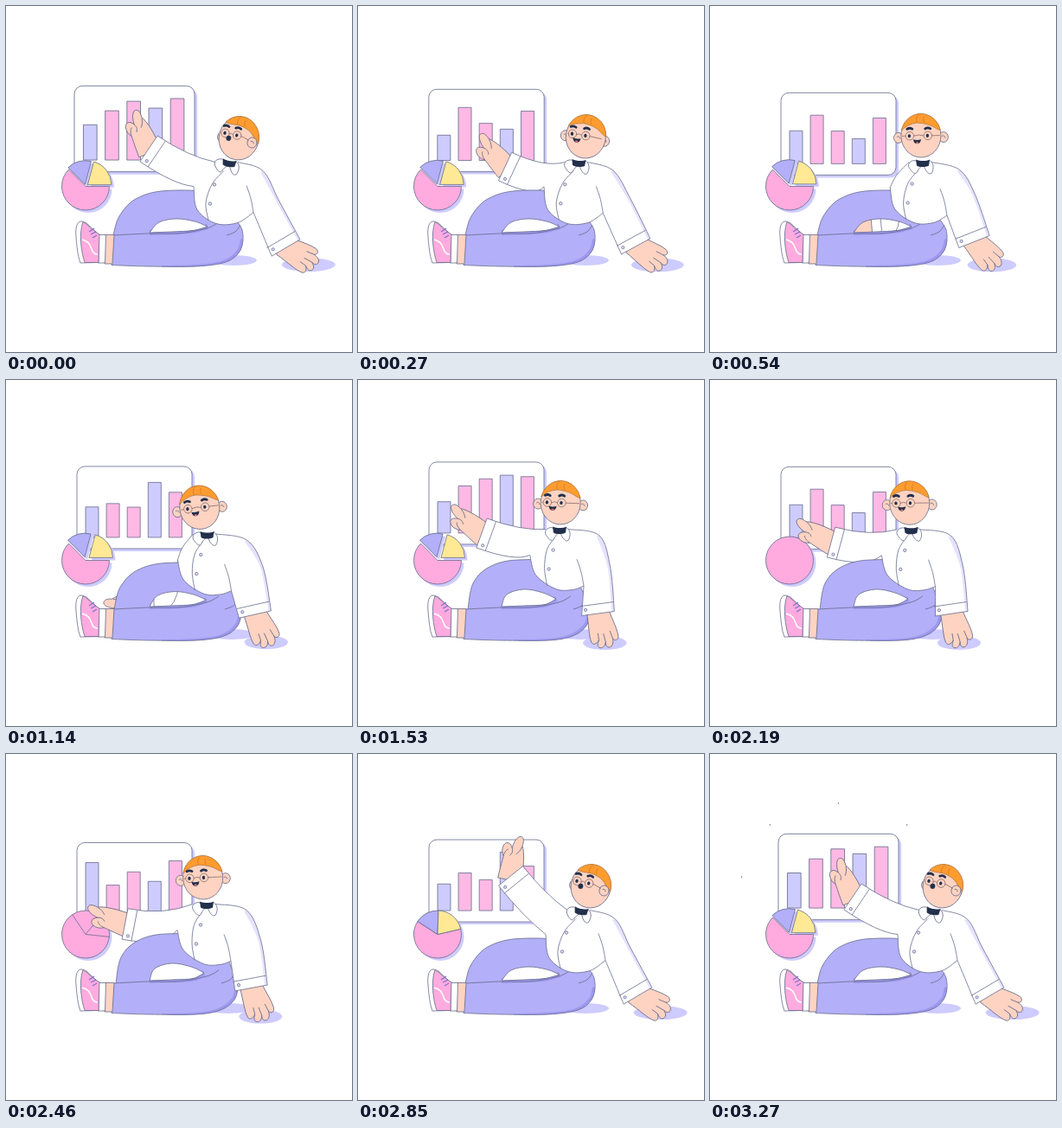
An HTML page with a canvas that plays this animation: 400 by 400 pixels, repeating every 3300 ms.

```html
<!DOCTYPE html>
<html lang="en">
<head>
<meta charset="utf-8">
<title>Chart presenter</title>
<style>
html, body { margin: 0; width: 100%; height: 100%; overflow: hidden; background: #fff; }
canvas { display: block; width: 100%; height: 100%; }
</style>
</head>
<body>
<canvas id="stage"></canvas>
<script>
const LOOP = 3300, BEAT = LOOP / 2, TAU = Math.PI * 2, RAD = Math.PI / 180;
const LINE = '#666b8c', LAV = '#cecbff', PINK = '#ffb9e4', ROSE = '#ffabdf', YELLOW = '#ffe994',
  VIOLET = '#b3aff8', SHADE = '#9d98ee', SKIN = '#fed3c1', HAIR = '#ff9c30', NAVY = '#22304c',
  WIRE = '#8a6f70', MIST = '#e5e2ff';

const canvas = document.getElementById('stage');
const c = canvas.getContext('2d');

// A pose: neck x y, resting wrist x y, pointing wrist x y and angle, head tilt, gaze
const tapBoard = [255, 180.5, 323.5, 279.5, 165, 165, -112, 11, -9.5];
const rest = [243, 180.5, 305.5, 272.5, 187, 255, -190, -1, -2.5];
const turning = [229.5, 178, 288, 271, 160, 256, -185, -7, -3.5];
const tapPie = [230, 172.5, 277.5, 270, 143, 177, -140, 2, -7];
const slicePie = [229, 173.5, 283.5, 270.5, 137.5, 196.5, -158, -3, -7];
const raise = [...tapBoard.slice(0, 4), 176.5, 141, -78, ...tapBoard.slice(7)];
const moves = [[0, tapBoard], [150, tapBoard], [540, rest], [980, rest], [1140, turning], [1380, tapPie],
  [1890, tapPie], [2460, slicePie], [2780, raise], [2850, raise], [3040, tapBoard], [LOOP, tapBoard]];

const clamp = v => Math.max(0, Math.min(1, v));
const ramp = (t, a, b) => clamp((t - a) / (b - a));
const smooth = (t, a, b) => { const p = ramp(t, a, b); return p * p * (3 - 2 * p); };
const easeOut = p => 1 - (1 - p) ** 3;
const dir = deg => [Math.cos(deg * RAD), Math.sin(deg * RAD)];
const go = (p, d, len) => [p[0] + d[0] * len, p[1] + d[1] * len];
const shift = (p, x, y) => [p[0] + x, p[1] + y];

// Monotone cubic through the moves, so passing poses keep their speed
function poseAt(t) {
  const i = Math.max(1, moves.findIndex(m => m[0] > t));
  const slope = (n, j) => n < 1 || n >= moves.length ? 0
    : (moves[n][1][j] - moves[n - 1][1][j]) / (moves[n][0] - moves[n - 1][0]);
  const mean = (a, b) => a * b > 0 ? 2 * a * b / (a + b) : 0;
  const [t0, from] = moves[i - 1], [t1, to] = moves[i], h = t1 - t0, s = (t - t0) / h;
  return from.map((v, j) => {
    const mid = slope(i, j);
    return v + (to[j] - v) * s * s * (3 - 2 * s)
      + h * s * (1 - s) * (mean(slope(i - 1, j), mid) * (1 - s) - mean(mid, slope(i + 1, j)) * s);
  });
}

// Smooth curves through points, joined by corners
function trace(...segs) {
  const p = new Path2D();
  segs.forEach((s, n) => {
    const pt = i => s[Math.max(0, Math.min(s.length - 1, i))];
    n ? p.lineTo(...s[0]) : p.moveTo(...s[0]);
    for (let i = 0; i < s.length - 1; i++) {
      const [a, b, d, e] = [pt(i - 1), pt(i), pt(i + 1), pt(i + 2)];
      p.bezierCurveTo(b[0] + (d[0] - a[0]) / 6, b[1] + (d[1] - a[1]) / 6,
        d[0] - (e[0] - b[0]) / 6, d[1] - (e[1] - b[1]) / 6, ...d);
    }
  });
  return p;
}
function paint(p, fill, line = LINE, width = .8) {
  if (fill) { c.fillStyle = fill; c.fill(p); }
  if (line) { c.strokeStyle = line; c.lineWidth = width; c.stroke(p); }
}
const svg = (d, fill, line, width) => paint(new Path2D(d), fill, line, width);
function oval(x, y, rx, ry, fill, line) {
  const p = new Path2D();
  p.ellipse(x, y, rx, ry, 0, 0, TAU);
  paint(p, fill, line);
}
const dot = (x, y, r, fill, line) => oval(x, y, r, r, fill, line);
function box(x, y, w, h, r, fill, line) {
  const p = new Path2D();
  p.roundRect(x, y, w, h, r);
  paint(p, fill, line);
}
function group(x, y, angle, scale, draw) {
  c.save();
  c.translate(x, y);
  c.rotate(angle * RAD);
  c.scale(scale, scale);
  draw();
  c.restore();
}

function burst(x, y, rx, ry, p) {
  if (p <= 0 || p >= 1) return;
  const colors = [YELLOW, PINK, PINK, LAV], e = easeOut(p);
  for (let i = 0; i < 8; i++) {
    const [dx, dy] = dir(i * 45);
    dot(x + dx * rx * e, y + dy * ry * e, 3.2 * (1 - p * p), colors[i % 4]);
  }
}

// Each bar: mean height, then cosine and sine weights of two harmonics
const WAVES = [[39, -10, 0, 10, 0], [48.7, 11.2, 8, -5.4, -3.2], [46.3, 8.5, -1, 10.2, -2.5],
  [48.9, 9.7, -19.7, -1.1, -1.6], [58.1, 3.5, 0, 6.4, 0]];

function board(t) {
  const w = t * TAU / BEAT, y = 146 - 4 * Math.cos(w), p = ramp(t, 2900, LOOP);
  const pop = smooth(t, 2920, 3080) + 1 - smooth(t, 0, 320);
  burst(148.5, 142, 112, 85, p);
  group(148.5, y, 0, 1 + .045 * pop, () => {
    box(-63.5, -44.5, 133, 95, 9, LAV, null);
    box(-66.5, -47.5, 133, 95, 9, '#fff');
    WAVES.forEach(([m, a, b, d, e], i) => {
      const h = m + a * Math.cos(w) + b * Math.sin(w) + d * Math.cos(2 * w) + e * Math.sin(2 * w);
      box(-56.5 + i * 24.1, 34.5 - h, 15, h, 0, i % 3 ? PINK : LAV);
    });
  });
  if (p > 0 && p < .85) {
    c.globalAlpha = .9 * (1 - ramp(p, .25, .85));
    group(148.5, y, 0, .3 + .78 * easeOut(ramp(p, 0, .35)), () => box(-66.5, -47.5, 133, 95, 9, LAV));
    c.globalAlpha = 1;
  }
}

function pie(t) {
  const R = 27.5, p = ramp(t, 1740, 2130), old = t < 1820;
  const spin = old ? 1 : smooth(t, 2480, 2850), open = old ? 1 : smooth(t, 2850, 3240);
  const tint = old ? 1 : ramp(t, 2490, 2640), cut = old ? 1 : ramp(t, 2200, 2420);
  const a = -124 - 23 * spin + 12 * open, b = -50 - 38 * spin + 13 * open, d = 6 - 19 * spin + 13 * open;
  const gap = open * 3 + (old ? 2 * smooth(t, 0, 900) : 0);
  const slice = (from, to, out, color, off, line) => {
    const [x, y] = go([off, off], dir((from + to) / 2), out), path = new Path2D();
    path.moveTo(x, y);
    path.arc(x, y, R, from * RAD, to * RAD);
    path.closePath();
    paint(path, off ? LAV : color, line);
  };
  if (p > 0 && p < .88) {
    c.globalAlpha = 1 - ramp(p, .42, .88);
    dot(92, 208.5, 36.5 * easeOut(ramp(p, 0, .3)), '#c8c3fd');
    c.globalAlpha = 1;
  }
  const q = ramp(p, .3, .72), fresh = p > .15 && p < 1;
  group(92, 208.5, 0, fresh ? .6 + .4 * Math.sqrt(q) : 1, () => {
    if (fresh) c.globalAlpha = q;
    if (tint < 1 || fresh) {
      dot(3, 3, R, LAV, null);
      dot(0, 0, R, ROSE);
      for (const g of [a, b, d]) paint(trace([[0, 0], go([0, 0], dir(g), R * cut)]));
    }
    if (tint > 0 && !fresh) {
      c.globalAlpha = tint;
      for (const off of [3, 0]) {
        slice(d, a + 360, 0, ROSE, off, off ? null : LINE);
        slice(a, b, gap * .8, VIOLET, off, off ? null : LINE);
        slice(b, d, gap, YELLOW, off, off ? null : LINE);
      }
    }
  });
  burst(92, 208.5, 57, 57, p);
}

// Seam and button a little way back up the sleeve
function cuff(outer, inner, along) {
  const a = go(outer, along, -11), b = go(inner, along, -11), mid = go(inner, along, -6);
  paint(trace([a, b]));
  dot(mid[0] + (outer[0] - inner[0]) * .14, mid[1] + (outer[1] - inner[1]) * .14, 1.6, MIST);
}

function pointingArm(wrist, angle, neck, armpit) {
  group(...wrist, angle, 1, () => {
    svg('M-5 -14C8 -14 15 -13 21 -13C27 -18 37 -16 37 -11C37 -8 34 -6 32 -5C38 -5 47 -2 47 2C47 6 42 7 37 6C30 10 14 13 -5 13Z', SKIN);
    svg('M32 -5C28 -3 25 -4 23 -6M21 -13C25 -13 29 -11 30 -9M36 6C31 5 28 3 26 1');
  });
  const d = dir((angle - 180) / 2), side = [-d[1], d[0]];
  const top = go(wrist, side, 18), low = go(wrist, side, -18);
  const sleeve = new Path2D();
  sleeve.moveTo(...neck);
  sleeve.quadraticCurveTo(...go(top, d, -42), ...top);
  sleeve.lineTo(...low);
  sleeve.quadraticCurveTo(...go(low, d, -48), ...armpit);
  paint(sleeve, '#fff');
  cuff(top, low, d);
}

function legs(k, hip) {
  const left = [166, 262], right = [233 - 4 * k, 255 - 2 * k];
  const under = [right, [216, 259.5], [192, 261], left];
  const hole = trace([left, [177 - 5 * k, 250 - 2 * k], [197 - 5 * k, 246 - 4 * k], [218 - 4 * k, 249 - 3 * k], right], under);
  const shape = trace(
    [[124 + 3 * k, 265], [131 + 2 * k, 243 - 8 * k], [150 + 2 * k, 223 - 7 * k], [185, 213.5 - 5.5 * k],
      [240, 218 - 5 * k], [hip - 6, 250], [hip, 266], [hip - 4, 284], [hip - 20, 296], [220, 301], [165, 301], [122, 299.5]],
    [[124, 265]]);
  shape.addPath(hole);
  c.fillStyle = VIOLET;
  c.fill(shape, 'evenodd');
  c.save();
  c.clip(shape, 'evenodd');
  paint(trace([[hip, 270], [hip - 5, 285], [hip - 22, 297], [220, 302], [180, 303]]), null, SHADE, 6);
  paint(trace(under), null, SHADE, 6);
  c.restore();
  paint(shape, null);
  paint(trace([[124, 265], [166, 263], [200, 263], [232, 257], [246, 250]]));
  paint(trace([[hip - 19, 265], [hip - 9, 261], [hip - 3, 253]]));
}

function shoe() {
  svg('M114 264.5H125L123 298H114Z', SKIN);
  svg('M106 264.5H115.5L114.5 297H106Z', '#fff');
  svg('M88 249C82 248 80 256 81 267C82 279 83 289 86 297L107 296.5V264L93 251Z', '#fff');
  svg('M89 249.5C94 252 97 257 108 264L107 296.5H91C87 285 84 263 89 249.5Z', ROSE);
  svg('M88 270C95 272 97 275 99 281C100 285 102 287 106 287', null, '#fff', 1.6);
  svg('M96 261L102 257M98 264L104 261M100 268L105 265', null, '#7a6fd0', 1.2);
}

function shirt(body, wrist, angle, turn, seam) {
  group(...wrist, angle, 1, () => {
    svg('M-6 -13C8 -13 20 -17 31 -16C36 -15 36 -10 32 -9C37 -9 42 -6 41 -2C40 1 37 1 34 0C39 2 41 6 38 9C36 11 33 9 30 7C34 11 34 15 30 16C22 17 12 14 -6 12Z', SKIN);
    svg('M32 -9L23 -8M34 0L24 0M30 7L22 6');
  });
  const { neck, left, right, shoulder, waist, belly } = body;
  const d = dir(45 + angle / 2), across = [d[1], -d[0]];
  const out = go(wrist, across, 19), inn = go(wrist, across, -19);
  const outer = [right, shoulder, shift(go(out, d, -52), 2, 0), out];
  const armpit = belly[belly.length - 1], low = belly[belly.length - 2];
  const side = [armpit, [(armpit[0] + left[0]) / 2 - 3, (armpit[1] + left[1]) / 2], left];
  const shape = trace(outer, [inn, waist], belly, side);
  paint(shape, '#fff', null);
  c.save();
  c.clip(shape);
  paint(trace(outer.slice(1)), null, MIST, 6);
  c.restore();
  paint(trace(outer, [inn, waist], belly));
  c.globalAlpha = seam;
  paint(trace(side));
  c.globalAlpha = 1;
  paint(trace([waist, shift(waist, -3, -16), shift(waist, -8, -31)]));
  cuff(out, inn, d);

  // Placket, buttons and collar
  const [x, y] = shift(neck, 3, 1), [px, py] = shift(low, 12, 0);
  paint(trace([[x - 6, y + 9], [(x + px) / 2 - 7, (y + py) / 2 - 3], [px - 2, py - 8], [px + 1, py + 12]]));
  dot(px + 8, py - 29, 1.7, MIST);
  dot(px + 3, py - 7, 1.7, MIST);
  group(x, y, turn * 10, 1, () => {
    svg('M-9 -3C-16 -3 -19 3 -14 8C-11 12 -8 13 -7 11C-5 7 -3 4 0 3Z', '#fff');
    svg('M7 -3C12 -2 14 6 10 12C7 14 3 9 1 3Z', '#fff');
    svg('M-8 -4C-3 -2 4 -2 8 -4L7 3C3 5 -4 5 -7 3Z', NAVY, null);
  });
}

function head(x, y, tilt, gaze, turn) {
  group(x, y, tilt, 1, () => {
    const near = 26 - 10 * turn, far = -26 + 7 * turn;
    const ear = ex => {
      oval(ex, 2, 5.5, 6, SKIN);
      svg(`M${ex - 2} 1q3 -2 4 2`);
    };
    ear(far);
    if (turn < .5) ear(near);
    oval(0, 0, 23, 25, SKIN);

    const from = (194 + turn * 24) * RAD, to = (346 + turn * 18) * RAD, rx = 23.4, ry = 25.6;
    const cap = new Path2D();
    cap.ellipse(0, 0, rx, ry, 0, from, to);
    cap.bezierCurveTo(16, -7 + turn * 5, 16, -13, -4, -15);
    cap.quadraticCurveTo(-15, -14, Math.cos(from) * rx, Math.sin(from) * ry);
    paint(cap, HAIR, '#a8743f', .7);
    svg('M-4 -15C-6 -18 -5 -22 -2 -25M4 -15C3 -18 3 -20 4 -22', null, '#c87722', .7);
    if (turn >= .5) ear(near);

    const gap = 23.5 + gaze, l = gaze - gap / 2, r = gaze + gap / 2, ey = -3 * turn;
    svg(`M${r + 5} ${ey}L${near - 4} 0M${l + 5} ${ey}Q${gaze} ${ey - 2} ${r - 5} ${ey}`, null, WIRE);
    if (turn < .5) svg(`M${l - 5} ${ey}L${far + 4} 0`, null, WIRE);
    c.lineCap = 'round';
    for (const ex of [l, r]) {
      dot(ex, ey, 4.8, null, WIRE);
      oval(ex - .5, ey, 1.7, 2.1, NAVY, null);
      svg(`M${ex - 3} ${ey - 8}q3 -2 6 0`, null, NAVY, 2.8);
    }
    c.lineCap = 'butt';
    const mx = gaze - 2, my = ey + 5;
    if (turn > .5) oval(mx, my, 2.9, 3.1, NAVY, null);
    else {
      svg(`M${mx - 4.5} ${my - 1}q4.5 1.6 9 0c-.5 7 -8.5 7 -9 0Z`, NAVY, null);
      oval(mx, my + 3, 1.6, .9, '#e9787f', null);
    }
  });
}

function draw(t) {
  const [nx, ny, wx, wy, px, py, point, tilt, gaze] = poseAt(t);
  const lean = clamp((nx - 229) / 26), lift = clamp((180.5 - ny) / 7), turn = clamp((-gaze - 7) / 2.5);
  const hip = 274 - 6 * lift, neck = [nx, ny];
  const sway = 6 * Math.sin(ramp(t, 0, 300) * Math.PI), wrist = [wx + sway, wy];
  const angle = 75 - (wx - 277.5);
  const body = {
    neck,
    left: shift(neck, -13, 0),
    right: shift(neck, 13, 0),
    shoulder: shift(neck, 49 - 7 * lean, 7 + 3 * lean),
    waist: shift(neck, 31, 66 - 8 * lean),
    belly: [[31, 66 - 8 * lean], [18 - 5 * lean, 70], [-1 - 11 * lean, 69 + 2 * lean],
      [-24 - 10 * lean, 53 + 2 * lean], [-31 - 7 * lean, 30 - 2 * lean]].map(p => shift(neck, ...p))
  };

  c.fillStyle = '#fff';
  c.fillRect(0, 0, 400, 400);
  oval(hip - 11, 294, 27, 6, LAV, null);
  oval(...shift(go(wrist, dir(angle), 30), 0, 5), 25 + 6 * lean, 8, LAV, null);
  board(t);
  pie(t);
  pointingArm([px, py], point, body.left, body.belly[4]);
  legs(lift, hip);
  shoe();
  shirt(body, wrist, angle, turn, ramp(py, 200, 230));
  head(nx + 2 + tilt * 1.1, ny - 30.5 + 3 * turn, tilt, gaze, turn);
}

const start = performance.now();
function frame() {
  const ratio = window.devicePixelRatio || 1;
  const w = Math.round(innerWidth * ratio), h = Math.round(innerHeight * ratio);
  if (canvas.width !== w || canvas.height !== h) { canvas.width = w; canvas.height = h; }
  c.setTransform(w / 400, 0, 0, h / 400, 0, 0);
  c.lineJoin = 'round';
  draw(Math.max(0, performance.now() - start) % LOOP);
  requestAnimationFrame(frame);
}
frame();
</script>
</body>
</html>
```
